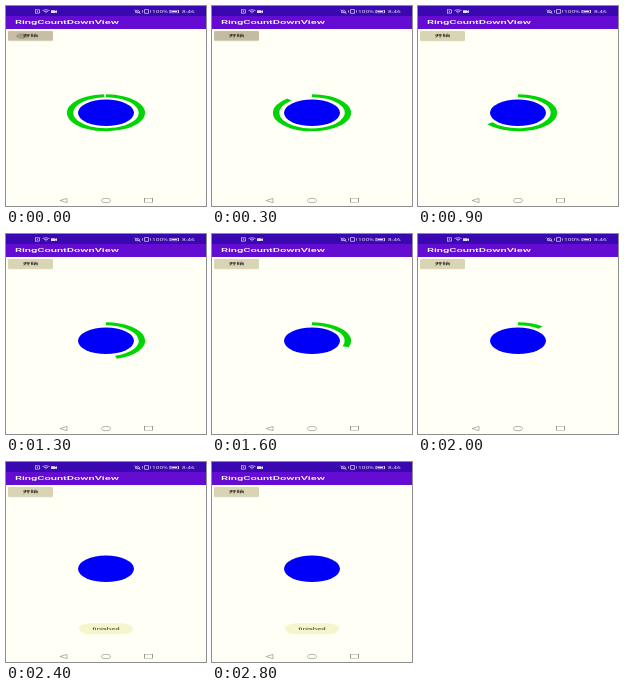
These frames come from a looping animation (200x200 px, 2.9 s). An HTML page:

```html
<!DOCTYPE html>
<html lang="en">
<head>
<meta charset="utf-8">
<title>Ring countdown</title>
<style>
  html, body { margin: 0; width: 100%; height: 100%; overflow: hidden; background: #fffff6; }
  svg { display: block; width: 100%; height: 100%; }
  text { font-family: Roboto, "Noto Sans CJK SC", "Noto Sans CJK", sans-serif; }
  .status text { font-size: 6.6px; fill: #e4dcf4; }
  .line { fill: none; stroke: #d8ccf0; stroke-width: 1; }
  .nav { fill: none; stroke: #8e8e86; stroke-width: .9; }
</style>
</head>
<body>
<!-- A tall phone screen squeezed into a square stage -->
<svg viewBox="0 0 200 422" preserveAspectRatio="none">
  <defs>
    <clipPath id="buttonClip"><rect x="2" y="53" width="45" height="20" rx="2"/></clipPath>
  </defs>
  <rect width="200" height="422" fill="#fffff6"/>
  <rect width="200" height="21.1" fill="#3a08b0"/>
  <rect y="21.1" width="200" height="27.4" fill="#640cd2"/>

  <g class="status">
    <path class="line" d="M29.5 7V16M29.5 8H33.5V15H29.5M31.5 10V13"/>
    <path class="line" d="M36.5 9.5Q40 6 43.5 9.5M38 12Q40 10 42 12"/>
    <circle cx="40" cy="14.5" r="1" fill="#e4dcf4"/>
    <path d="M45 9H49V10.5L51 9V15L49 13.5V15H45Z" fill="#e4dcf4"/>
    <path class="line" d="M129.5 14H133.5V11Q131.5 6.5 129.5 11V14M128.5 8L134.5 16"/>
    <path class="line" d="M138.5 7.5H142.5V15.5H138.5ZM136.5 9V14M144.5 9V14"/>
    <text x="146" y="14">100%</text>
    <rect class="line" x="164" y="9" width="8.5" height="5.5"/>
    <rect x="165.5" y="10.5" width="5.5" height="2.5" fill="#e4dcf4"/>
    <text x="176" y="14">8:46</text>
  </g>
  <text x="9" y="38.5" font-size="11.1" font-weight="500" fill="#fff">RingCountDownView</text>

  <rect x="2" y="54" width="45" height="20.5" rx="2" fill="#aaa68c" opacity=".4"/>
  <rect x="2" y="53" width="45" height="20" rx="2" fill="#d9d4b4"/>
  <g clip-path="url(#buttonClip)">
    <rect id="press" x="2" y="53" width="45" height="20" fill="#c3bba2"/>
    <circle id="ripple" cx="16" cy="63.5" fill="#96907c"/>
  </g>
  <text x="24.5" y="66" font-size="7.8" font-weight="700" text-anchor="middle" fill="#2c2a24">开始</text>

  <path id="ring" fill="none" stroke="#00d404" stroke-width="6.4"/>
  <circle cx="100" cy="225.4" r="28" fill="#0000fa"/>

  <g id="toast">
    <rect x="73" y="340" width="54" height="23.5" rx="11.7" fill="#f6f6cc"/>
    <text x="100" y="354.5" font-size="7.8" text-anchor="middle" fill="#3c3a34">finished</text>
  </g>

  <g class="nav">
    <path d="M54 410.5L61 406V415Z"/>
    <circle cx="100" cy="410.5" r="4.5"/>
    <rect x="138.5" y="406.5" width="8" height="8"/>
  </g>
</svg>
<script>
  const LOOP = 2900, STEP = 100;
  const CX = 100, CY = 225.4, R = 35.9;
  const sweepKeys = [[0, 357], [300, 321], [900, 232], [1300, 164], [2000, 39], [2200, 3], [2300, 0]];
  const pressKeys = [[0, .8], [100, 1], [400, 1], [900, 0]];
  const rippleKeys = [[0, .7], [200, 0]];
  const toastKeys = [[2200, 0], [2400, 1]];
  const el = id => document.getElementById(id);
  const [ring, press, ripple, toast] = ["ring", "press", "ripple", "toast"].map(el);

  function sample(keys, t) {
    if (t <= keys[0][0]) return keys[0][1];
    for (let i = 1; i < keys.length; i++) {
      const [t0, a] = keys[i - 1], [t1, b] = keys[i];
      if (t <= t1) return a + (b - a) * (t - t0) / (t1 - t0);
    }
    return keys[keys.length - 1][1];
  }

  function arc(deg) {
    if (deg <= 0) return "";
    const a = deg * Math.PI / 180;
    const x = CX + R * Math.sin(a), y = CY - R * Math.cos(a);
    return `M${CX} ${CY - R}A${R} ${R} 0 ${deg > 180 ? 1 : 0} 1 ${x} ${y}`;
  }

  function draw(time) {
    const t = Math.floor((time % LOOP) / STEP) * STEP;
    ring.setAttribute("d", arc(sample(sweepKeys, t)));
    press.setAttribute("opacity", sample(pressKeys, t));
    ripple.setAttribute("r", 6 + t * .12);
    ripple.setAttribute("opacity", sample(rippleKeys, t));
    toast.setAttribute("opacity", sample(toastKeys, t));
  }

  const start = performance.now();
  function tick() {
    draw(performance.now() - start);
    requestAnimationFrame(tick);
  }
  tick();
</script>
</body>
</html>
```
